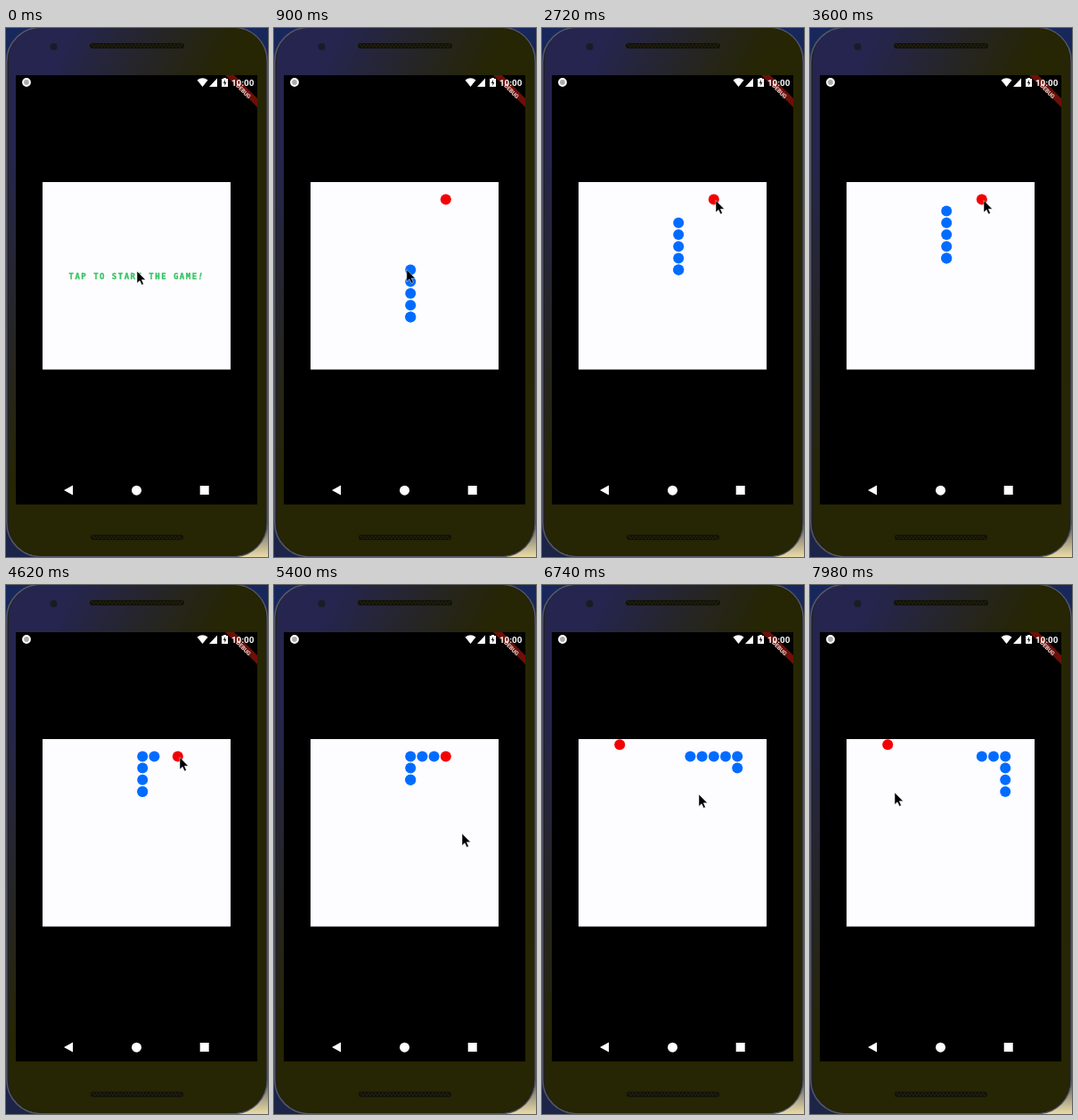
Animation, 294 px wide and 594 px high, one loop 8000 ms. Source, as an HTML page:

```html
<!DOCTYPE html>
<html lang="en">
<head>
<meta charset="utf-8">
<title>Snake on a phone</title>
<style>
  html, body { margin: 0; width: 100%; height: 100%; overflow: hidden; background: #000; }
  svg { display: block; width: 294px; height: 594px; }
  .title { font: bold 9px "DejaVu Sans Mono", monospace; letter-spacing: 1.49px;
           fill: #37c463; stroke: #37c463; stroke-width: .35px; }
  .title tspan { font-style: italic; }
  .clock { font: bold 9.8px Roboto, sans-serif; fill: #fff; }
  .debug { font: bold 6.4px Roboto, sans-serif; fill: #e8dada; text-anchor: middle; }
</style>
</head>
<body>
<svg viewBox="0 0 294 594">
  <defs>
    <linearGradient id="wallpaper" x2="0" y2="1">
      <stop offset="0" stop-color="#18285c"/>
      <stop offset=".5" stop-color="#141a3c"/>
      <stop offset=".93" stop-color="#4a4c58"/>
      <stop offset="1" stop-color="#ebdca6"/>
    </linearGradient>
    <linearGradient id="sheen" gradientUnits="userSpaceOnUse" x1="62" y1="31" x2="210" y2="105">
      <stop offset="0" stop-color="#25254f"/>
      <stop offset="1" stop-color="#262504"/>
    </linearGradient>
    <clipPath id="body"><rect x="3" y="0" width="289" height="593" rx="36"/></clipPath>
  </defs>

  <!-- phone -->
  <rect width="294" height="594" fill="url(#wallpaper)"/>
  <rect y="540" width="40" height="54" fill="#1c2448"/>
  <rect x=".8" y="-.5" width="292.4" height="594" rx="38" fill="#202024" stroke="#555868" stroke-width="1.5"/>
  <rect width="294" height="594" fill="url(#sheen)" clip-path="url(#body)"/>
  <circle cx="53.5" cy="21" r="4" fill="#1b1b26"/>
  <g stroke="#121208" stroke-width="6" stroke-linecap="round">
    <path d="M97 20H197M98 572H196"/>
  </g>
  <g stroke="#2c2b10" stroke-dasharray="2 2">
    <path d="M96 19H198M98 21H198M97 571H197M99 573H197"/>
  </g>
  <rect x="11" y="53" width="271" height="482"/>

  <!-- status bar -->
  <path d="M246 53H256L282 79V89Z" fill="#6c1008"/>
  <text class="debug" transform="translate(266.2 71.2) rotate(45)" y="1.8">DEBUG</text>
  <circle cx="23" cy="61" r="3.9" fill="#aaa" stroke="#fff" stroke-width="2"/>
  <g fill="#fff">
    <path d="M214.5 58.5Q220.5 54 226.5 58.5L220.5 66Z"/>
    <path d="M228 66L237 56.5V66Z"/>
    <path d="M242 57H244V56H247V57H249V66H242Z"/>
    <path d="M246 58L243.8 62H245.3V65L247.4 61H246Z" fill="#222"/>
    <text class="clock" x="253" y="64.8">10:00</text>
    <!-- navigation -->
    <path d="M65 519L75 513.5V524.5Z"/>
    <circle cx="146.5" cy="519.2" r="5.5"/>
    <rect x="217.7" y="514" width="10" height="10"/>
  </g>

  <!-- game -->
  <rect x="41" y="173" width="211" height="210.5" fill="#fdfcff"/>
  <text id="title" class="title" x="70.5" y="282.3">TAP TO START THE GAME<tspan>!</tspan></text>
  <g id="pieces"></g>
  <path id="cursor" d="M0 0V13.6L3.1 10.7L5.3 15.4L7.4 14.4L5.3 9.8H9.6Z" stroke="#fff" stroke-width=".5"/>
</svg>
<script>
  const LOOP = 8000, START = 452, TICK = 555, CELL = 13.2;
  const EAT_TICK = 9;
  const POINTER = [ // time, x, y
    [0, 147, 273], [700, 147, 273], [1740, 166, 255], [2720, 195, 193.5],
    [4620, 195, 193.5], [5400, 211, 279], [6740, 176, 235], [7980, 95, 233]
  ];
  const $ = id => document.getElementById(id);
  const clamp = (v, lo, hi) => Math.min(hi, Math.max(lo, v));

  const dots = Array.from({ length: 7 }, () => {
    const dot = document.createElementNS("http://www.w3.org/2000/svg", "circle");
    dot.setAttribute("r", 6);
    return $("pieces").appendChild(dot);
  });

  function place(dot, [col, row], color) {
    dot.setAttribute("cx", 41 + CELL * (col + .5));
    dot.setAttribute("cy", 172.6 + CELL * (row + .5));
    dot.setAttribute("fill", color);
  }

  // The route runs up column 8, right along row 1 and down column 13.
  const route = i => [clamp(i - 2, 8, 13), i <= 10 ? 11 - i : Math.max(1, i - 14)];

  function drawGame(t) {
    const playing = t >= START;
    $("title").style.display = playing ? "none" : "";
    $("pieces").style.display = playing ? "" : "none";
    if (!playing) return;
    const tick = Math.floor((t - START) / TICK);
    const eaten = tick >= EAT_TICK ? 1 : 0;
    const head = tick + 4 + eaten, length = 5 + eaten;
    for (let i = 0; i < 6; i++) {
      place(dots[i], route(head - Math.min(i, length - 1)), "#006cff");
    }
    place(dots[6], eaten ? [3, 0] : [11, 1], "#f40000");
  }

  function drawPointer(t) {
    const found = POINTER.findIndex(p => p[0] > t);
    const next = found < 0 ? POINTER.length - 1 : found;
    const [t0, x0, y0] = POINTER[next - 1], [t1, x1, y1] = POINTER[next];
    const k = clamp((t - t0) / (t1 - t0), 0, 1), e = k * k * (3 - 2 * k);
    $("cursor").setAttribute("transform", `translate(${x0 + (x1 - x0) * e} ${y0 + (y1 - y0) * e})`);
  }

  const origin = performance.now();
  function frame() {
    const t = Math.max(0, performance.now() - origin) % LOOP;
    drawGame(t);
    drawPointer(t);
    requestAnimationFrame(frame);
  }
  frame();
</script>
</body>
</html>
```
